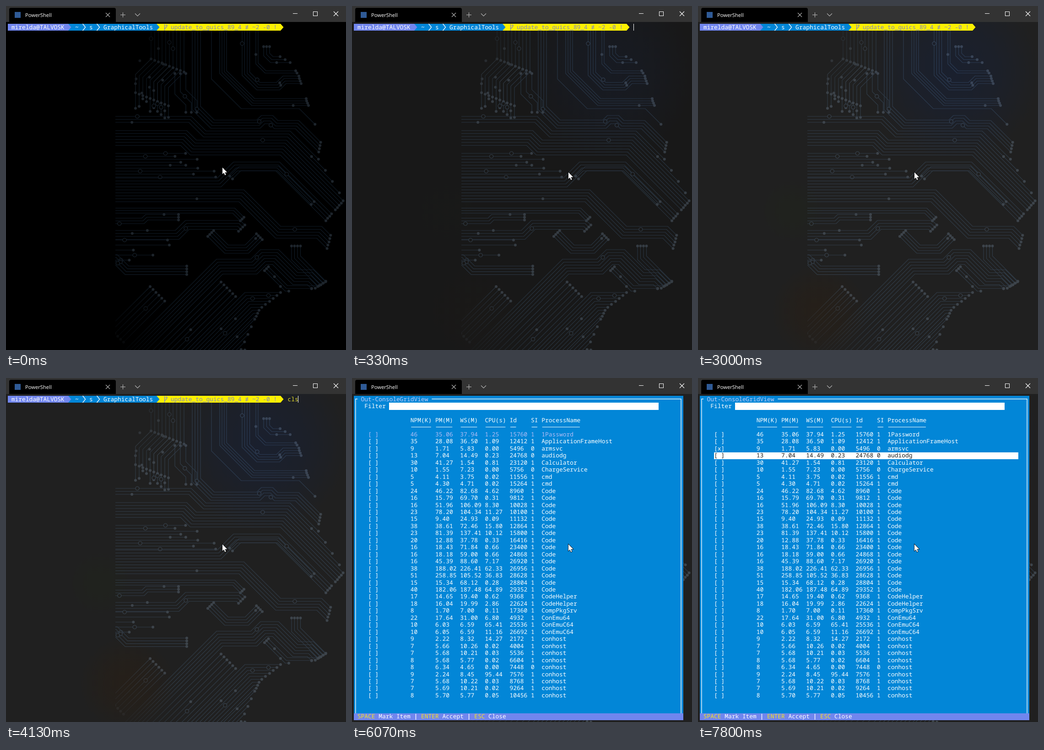
These frames come from a looping animation (743 by 754 pixels, 8000 ms). An HTML page with a canvas:

```html
<!DOCTYPE html>
<html lang="en">
<head>
<meta charset="utf-8">
<title>Terminal grid view</title>
<style>
html, body { margin: 0; width: 100%; height: 100%; overflow: hidden; background: #000; }
canvas { display: block; }
</style>
</head>
<body>
<canvas id="stage" width="743" height="754"></canvas>
<script>
const W = 743, H = 754, LOOP = 8000;
const CW = 7.74, RH = 15.46, LEFT = 4, TOP = 39;
const MONO = '12.9px "Noto Sans Mono", "DejaVu Sans Mono", monospace';
const BLUE = '#0286d7', VIOLET = '#7186ee', YELLOW = '#fdf000';
const c = document.getElementById('stage').getContext('2d');

const colX = n => LEFT + n * CW;
const rowY = n => TOP + n * RH;

function rect(x, y, w, h, fill) {
  c.fillStyle = fill;
  c.fillRect(x, y, w, h);
}

function poly(g, pts) {
  g.beginPath();
  for (let i = 0; i < pts.length; i += 2) g.lineTo(pts[i], pts[i + 1]);
}

function stroke(color, width, ...pts) {
  c.strokeStyle = color;
  c.lineWidth = width;
  poly(c, pts);
  c.stroke();
}

function text(str, col, row, color) {
  c.fillStyle = color;
  c.fillText(str, colX(col), rowY(row) + 11.6);
}

let seed = 7;
function rand(a, b) {
  seed = (seed * 16807) % 2147483647;
  return a + (b - a) * seed / 2147483647;
}

// ---- circuit board in the shape of a head, drawn once ----
const HEADING = { E: [1, 0], SE: [1, 1], S: [0, 1], NE: [1, -1], N: [0, -1] };
const FACE = new Path2D('M230 0H555L563 89L620 124L638 150L660 218L688 295L681 333' +
  'L738 425L696 473L710 500L697 545L704 600L676 618L601 627L553 665L513 754L360 800H220Z');

function makeCircuit() {
  const layer = document.createElement('canvas');
  layer.width = W;
  layer.height = H;
  const g = layer.getContext('2d');
  g.rect(239, 54, W - 239, H - 54);
  g.clip();
  g.lineWidth = 1.2;

  function dot(x, y) {
    g.fillStyle = '#1d242b';
    g.beginPath();
    g.arc(x, y, 3, 0, 7);
    g.fill();
  }

  function ring(x, y) {
    g.strokeStyle = '#1a2530';
    g.fillStyle = '#000';
    g.beginPath();
    g.arc(x, y, 4, 0, 7);
    g.fill();
    g.stroke();
  }

  // one vertex per leg; a last leg without a length runs up to the face
  function walk(x, y, legs) {
    const pts = [[x, y]], dirs = [];
    for (const [, name, len] of legs.matchAll(/([A-Z]+)([\d.]*)/g)) {
      const [dx, dy] = HEADING[name], size = Math.hypot(dx, dy);
      dirs.push([dx / size, dy / size]);
      x += dx * (len || 1);
      y += dy * (len || 1);
      pts.push([x, y]);
    }
    return { pts, dirs, open: /[A-Z]$/.test(legs) };
  }

  // n parallel traces, "gap" apart, with mitred corners
  function bus(n, gap, x, y, legs) {
    const { pts, dirs, open } = walk(x, y, legs);
    const last = dirs.length;
    for (let k = 0; k < n; k++) {
      const line = pts.map(([px, py], i) => {
        const a = dirs[Math.max(0, i - 1)], b = dirs[Math.min(last - 1, i)];
        const m = k * gap / (1 + a[0] * b[0] + a[1] * b[1]);
        return [px - (a[1] + b[1]) * m, py + (a[0] + b[0]) * m];
      });
      const end = line[last], [dx, dy] = dirs[last - 1];
      for (let i = 0; open && i < 400 && (end[1] > H || g.isPointInPath(FACE, ...end)); i++) {
        end[0] += dx;
        end[1] += dy;
      }
      g.strokeStyle = '#101b26';
      poly(g, line.flat());
      g.stroke();
      dot(...line[0]);
      dot(...end);
      if (rand(0, 1) < 0.5) {
        const i = Math.floor(rand(0, last)), u = rand(0.2, 0.8);
        const [p, q] = [line[i], line[i + 1]];
        const mark = rand(0, 1) < 0.6 ? ring : dot;
        mark(p[0] + (q[0] - p[0]) * u, p[1] + (q[1] - p[1]) * u);
      }
    }
  }

  // comb of hanging traces, upper left
  for (let x = 283; x < 360; x += 8) {
    const bend = 150 + 0.4 * (x - 283);
    bus(1, 0, x + 34, 45, `S${bend - 79}`);
    poly(g, [x + 34, bend - 34, x, bend, x, bend + 40]);
    g.stroke();
    bus(1, 0, x, bend + 40, `S${rand(5, 45)}`);
    dot(rand(250, 350), rand(80, 200));
  }
  bus(3, -12, 369, 148, 'S45 SE24 S16');

  // crown
  bus(4, 6, 425, 45, 'S175 SE30 E93 NE10 E25 SE11 E46 SE');
  bus(1, 0, 449, 45, 'S115 SE65 E127 SE');
  bus(4, -5, 467, 45, 'S103 SE70 E');
  bus(4, -5.5, 516, 45, 'S107 SE32 E50 NE14 E');
  bus(2, -5, 546, 45, 'S82 SE20 E');
  bus(3, -6.5, 563, 89, 'S20 SE15 E');

  // brow, nose, mouth
  bus(3, 6.5, 230, 242, 'E175 SE32 E184 SE');
  bus(6, 6.5, 230, 273, 'E165 SE21 E197 SE');
  for (let y = 323; y < 376; y += 6.5) bus(1, 0, 230, y, `E${rand(110, 235)}`);
  bus(4, 6.5, 230, 377, 'E232 NE35 E101 SE');
  bus(2, -9, 495, 379, 'NE18 E80 SE74');
  bus(5, 6.5, 230, 403, 'E290 SE80 E90 SE');

  // cheek
  bus(3, 5.5, 230, 443, 'E270 SE20');
  bus(3, 6, 230, 465, 'E67 NE8 E72');
  bus(4, 6.5, 230, 492, 'E140 NE22 E120 SE10');
  for (let y = 513; y < 565; y += 11) bus(1, 0, 230, y, `E${rand(30, 150)}`);
  bus(4, 6.2, 225, 545, 'E18 SE25 E127');
  bus(4, -6, 441, 505, 'SE37 E52 NE30');

  // jaw and neck
  bus(6, 6.5, 225, 790, 'NE235 E75 NE21 E40 SE44 E32 SE');
  bus(4, -6.5, 624, 526, 'S30 SE');
  bus(3, -6, 565, 580, 'SE45 E');
  bus(6, 9, 225, 705, 'NE90');
  bus(6, 9, 285, 790, 'NE185');
  bus(4, 6.5, 360, 790, 'NE162 E');
  bus(5, 6.5, 397, 790, 'NE136 E');
  bus(6, 6.5, 440, 790, 'NE');

  // corners fade out
  g.globalCompositeOperation = 'destination-out';
  for (const y of [40, 770]) {
    const f = g.createRadialGradient(230, y, 20, 230, y, 180);
    f.addColorStop(0, 'rgba(0,0,0,.9)');
    f.addColorStop(1, 'rgba(0,0,0,0)');
    g.fillStyle = f;
    g.fillRect(0, 0, W, H);
  }
  return layer;
}
const circuit = makeCircuit();

// ---- window parts ----
function glow(x, y, r, rgb, alpha) {
  const f = c.createRadialGradient(x, y, 0, x, y, r);
  f.addColorStop(0, `rgba(${rgb},${alpha})`);
  f.addColorStop(0.5, `rgba(${rgb},${alpha * 0.65})`);
  f.addColorStop(1, `rgba(${rgb},0)`);
  rect(x - r, y - r, 2 * r, 2 * r, f);
}

function backdrop(level) {
  const v = Math.round(32 * level);
  rect(0, 0, W, H, `rgb(${v},${v},${v})`);
  glow(560, 145, 190, '22,32,56', 0.6 * level ** 2);
  glow(265, 670, 105, '46,30,14', 0.4 * level ** 6);
  glow(205, 450, 70, '32,38,26', 0.4 * level ** 6);
  c.globalCompositeOperation = 'lighter';
  c.drawImage(circuit, 0, 0);
  c.globalCompositeOperation = 'source-over';
}

function titleBar() {
  rect(0, 0, W, 35, '#333');
  c.fillStyle = '#000';
  c.beginPath();
  c.roundRect(7, 4, 233, 31, [4, 4, 0, 0]);
  c.fill();
  rect(19, 13, 13, 13, '#2f5a96');
  c.font = '11.2px "Open Sans", "Noto Sans", sans-serif';
  c.fillStyle = '#fff';
  c.fillText('PowerShell', 42, 24);
  const gray = '#b4b4b4';
  stroke(gray, 1.1, 218, 15, 227, 24);
  stroke(gray, 1.1, 227, 15, 218, 24);
  stroke(gray, 1.1, 250, 19.5, 261, 19.5);
  stroke(gray, 1.1, 255.5, 14, 255.5, 25);
  stroke(gray, 1.1, 282, 16.5, 287.5, 22, 293, 16.5);
  stroke('#fff', 1, 627, 16.5, 637, 16.5);
  c.strokeRect(671.5, 12.5, 9, 9);
  stroke('#fff', 1.1, 716, 12, 726, 22);
  stroke('#fff', 1.1, 726, 12, 716, 22);
}

function segment(from, to, fill) {
  const a = Math.round(colX(from)), b = Math.round(colX(to));
  c.fillStyle = fill;
  poly(c, [a, TOP, b, TOP, b + 6.5, TOP + 7.5, b, TOP + 15, a, TOP + 15]);
  c.fill();
}

function prompt() {
  segment(42, 77, YELLOW);
  segment(17, 42, BLUE);
  segment(0, 17, VIOLET);
  text('mirelda@TALVOSK', 1, 0, '#fff');
  text('~', 19, 0, '#fff');
  text('s', 23, 0, '#fff');
  text('GraphicalTools', 27, 0, '#fff');
  for (const n of [21, 25]) {
    const x = colX(n);
    stroke('#fff', 1.3, x + 1, TOP, x + 7, TOP + 7.5, x + 1, TOP + 15);
  }
  const ink = '#8088c0';
  stroke(ink, 1.3, 346.5, 40, 346.5, 54);
  stroke(ink, 1.3, 346.5, 50, 351, 46, 351, 43);
  stroke(ink, 1.1, 348.5, 44, 351, 41, 353.5, 44);
  text('update_to_guics_89_4 ≢ ~2 -0 !', 46, 0, ink);
}

const caret = (col, row) => rect(Math.floor(colX(col) + 0.1), Math.round(rowY(row)), 1, 15, '#fff');

const HEAD = [...'NPM(K) PM(M)  WS(M)  CPU(s) Id    SI ProcessName'.matchAll(/\S+/g)]
  .map(m => ({ name: m[0], col: 16 + m.index }));
const ROWS = `46 35.06 37.94 1.25 15760 1 1Password
35 28.08 36.50 1.09 12412 1 ApplicationFrameHost
9 1.71 5.83 0.00 5496 0 armsvc
13 7.04 14.49 0.23 24768 0 audiodg
30 41.27 1.54 0.81 23120 1 Calculator
10 1.55 7.23 0.00 5756 0 ChargeService
5 4.11 3.75 0.02 11556 1 cmd
5 4.30 4.71 0.02 15264 1 cmd
24 46.22 82.68 4.62 8960 1 Code
16 15.79 69.70 0.31 9812 1 Code
16 51.96 106.09 8.30 10028 1 Code
23 78.20 104.34 11.27 10100 1 Code
15 9.40 24.93 0.09 11132 1 Code
38 38.61 72.46 15.80 12864 1 Code
23 81.39 137.41 10.12 15800 1 Code
20 12.88 37.78 0.33 16416 1 Code
16 18.43 71.84 0.66 23400 1 Code
16 18.18 59.00 0.66 24868 1 Code
16 45.39 88.60 7.17 26920 1 Code
38 188.02 226.41 62.33 26956 1 Code
51 258.85 105.52 36.83 28628 1 Code
15 15.34 68.12 0.28 28804 1 Code
40 182.06 187.48 64.89 29352 1 Code
17 14.65 19.40 0.62 9368 1 CodeHelper
18 16.04 19.99 2.86 22624 1 CodeHelper
8 1.70 7.00 0.11 17360 1 CompPkgSrv
22 17.64 31.00 6.80 4932 1 ConEmu64
10 6.03 6.59 65.41 25536 1 ConEmuC64
10 6.05 6.59 11.16 26692 1 ConEmuC64
9 2.22 8.32 14.27 2172 1 conhost
7 5.66 10.26 0.02 4004 1 conhost
7 5.68 10.21 0.03 5536 1 conhost
8 5.68 5.77 0.02 6604 1 conhost
8 6.34 4.65 0.00 7448 0 conhost
9 2.24 8.45 95.44 7576 1 conhost
7 5.68 10.22 0.03 8768 1 conhost
7 5.69 10.21 0.02 9264 1 conhost
8 5.70 5.77 0.05 10456 1 conhost`.split('\n').map(r => r.split(' '));

function gridView(picked, marked) {
  const right = Math.round(colX(93)), bottom = Math.round(rowY(45));
  rect(LEFT, TOP, right - LEFT, bottom - TOP, BLUE);
  const line = '#e4f2fc';
  stroke(line, 1.5, 12, 46, 7.8, 46, 7.8, bottom);
  stroke(line, 1.5, colX(22), 46, colX(92.4), 46, colX(92.4), bottom);
  text('Out-ConsoleGridView', 2, 0, '#c3cbfa');
  text('Filter', 3, 1, '#fff');
  rect(81, 54, 589, 16, '#fff');
  for (const { name, col } of HEAD) {
    text(name, col, 3, '#fff');
    stroke('#fff', 1.1, colX(col) + 1.5, 107.5, colX(col + name.length) - 1.5, 107.5);
  }
  ROWS.forEach((cells, i) => {
    const row = i + 5;
    let ink = '#fff';
    if (i === picked) {
      const y = Math.round(rowY(row));
      rect(35, y, 665, Math.round(rowY(row + 1)) - y, '#fff');
      ink = '#1c1c1c';
    } else if (picked < 0 && i === 0) {
      ink = '#b4bdf6';
    }
    text(marked && i === 2 ? '[x]' : '[ ]', 4, row, ink);
    cells.forEach((s, k) => text(s, HEAD[k].col, row, ink));
  });
  rect(LEFT, bottom, right - LEFT, 15, VIOLET);
  [['SPACE', 1, 'Mark Item'], ['ENTER', 19, 'Accept'], ['ESC', 34, 'Close']]
    .forEach(([key, col, label]) => {
      text(key, col, 45, '#f0e420');
      text(label, col + key.length + 1, 45, '#fff');
    });
  for (const n of [17.5, 32.5]) stroke('#fff', 1.4, colX(n), bottom + 1, colX(n), bottom + 14);
}

function pointer(x, y) {
  c.save();
  c.translate(x, y);
  poly(c, [0, 0, 0, 14.5, 3.2, 11.5, 5.4, 16.8, 7.7, 15.9, 5.5, 10.7, 10.2, 10.4]);
  c.closePath();
  c.strokeStyle = '#000';
  c.lineWidth = 1.4;
  c.stroke();
  c.fillStyle = '#fff';
  c.fill();
  c.restore();
}

// ---- timing ----
const step = (t, list) => list.reduce((v, [at, x]) => t >= at ? x : v, list[0][1]);

const BLINK = [270, 800, 1330, 1870, 2470, 3000, 3600, 5070, 5400];
const TYPED = [[0, ''], [4130, 'cls'], [4600, 'gps | ocg'], [5400, 'gps | ocgv']];
const PICKED = [[0, -1], [7070, 0], [7200, 1], [7400, 2], [7800, 3]];

// the window lightens in four eased steps
function lightness(t) {
  const k = Math.max(0, Math.min(4, Math.ceil((t - 263) / 66.7)));
  return 1 - (1 - k / 4) ** 2;
}

function draw(t) {
  backdrop(lightness(t));
  titleBar();
  c.font = MONO;
  c.textRendering = 'geometricPrecision';
  c.letterSpacing = CW - c.measureText('M').width + 'px';
  if (t < 6070) {
    prompt();
    const typed = step(t, TYPED);
    text(typed.replace('|', ' '), 79, 0, '#e2d92a');
    if (typed.includes('|')) stroke('#fff', 1.5, colX(83.5), 40, colX(83.5), 53.5);
    if (t >= 5800) caret(0, 1);
    else if (BLINK.filter(at => t >= at).length % 2) caret(79 + typed.length, 0);
  } else {
    gridView(step(t, PICKED), t >= 7600);
  }
  c.letterSpacing = '0px';
  pointer(473, t < 70 ? 354 : 364.5);
}

const start = performance.now();
function tick() {
  draw((performance.now() - start) % LOOP);
  requestAnimationFrame(tick);
}
tick();
</script>
</body>
</html>
```
